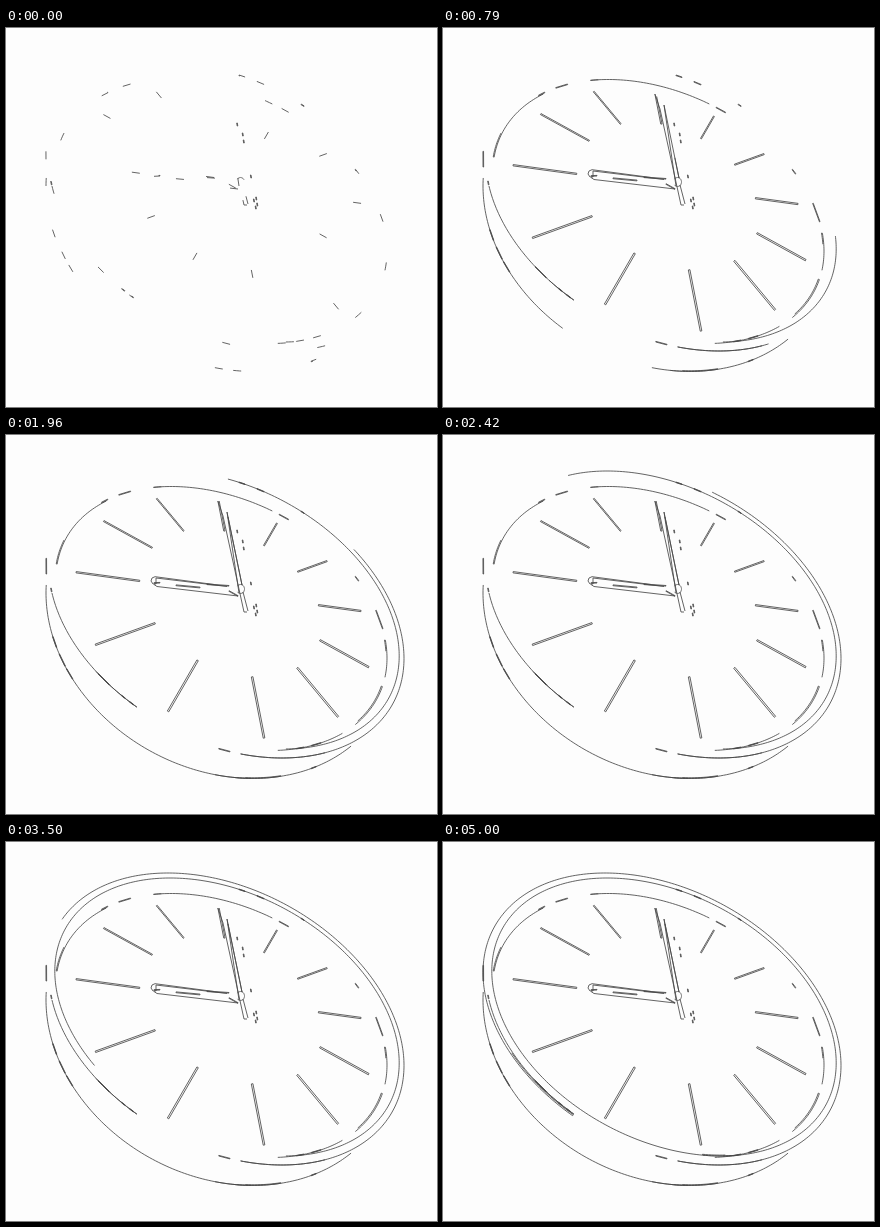
Write an HTML page that moves like this. It is 431 by 379 pixels and loops after 5210 ms.

```html
<!DOCTYPE html>
<html lang="en">
<head>
<meta charset="utf-8">
<title>Clock line drawing</title>
<style>
html, body { margin: 0; width: 100%; height: 100%; overflow: hidden; background: #fdfdfd; }
svg { display: block; width: 431px; height: 379px; }
path { fill: none; stroke: #484848; stroke-width: .85; stroke-linejoin: round; }
</style>
</head>
<body>
<svg id="stage" viewBox="0 0 431 379"></svg>
<script>
const LOOP = 5210, FRAME = 41.68, LAST = 120;
const FIRST_LENGTH = 8, SPEED = 8.9; // pixels drawn at the start, and per frame
const stage = document.getElementById('stage');
const strokes = [];

function line(points) {
  const path = document.createElementNS('http://www.w3.org/2000/svg', 'path');
  path.setAttribute('d', 'M' + points.map(p => p.map(v => v.toFixed(2)).join(' ')).join('L'));
  stage.append(path);
  strokes.push({ path, length: path.getTotalLength() });
}

// Thin outline that runs out along one side and back along the other
function bar([x1, y1], [x2, y2], width = .6) {
  const length = Math.hypot(x2 - x1, y2 - y1);
  const dx = -(y2 - y1) / length * width / 2, dy = (x2 - x1) / length * width / 2;
  const start = [x1 + dx, y1 + dy];
  line([start, [x2 + dx, y2 + dy], [x2 - dx, y2 - dy], [x1 - dx, y1 - dy], start]);
}

// Slanted ellipse: w and h are half extents, lean is the drop of its rightmost point
const ring = (cx, cy, w, h, lean) => (degrees, inset = 0) => {
  const t = degrees * Math.PI / 180, cos = Math.cos(t), sin = Math.sin(t);
  const scale = 1 - inset / ((w + h) / 2);
  return [cx + scale * w * cos, cy + scale * (lean * cos + Math.sqrt(h * h - lean * lean) * sin)];
};

// Runs through the angles in turn; the last leg lies a little inside
function trace(shape, angles, inset = 0) {
  const points = [];
  for (let i = 1; i < angles.length; i++) {
    const from = angles[i - 1], to = angles[i];
    const steps = Math.ceil(Math.abs(to - from));
    const gap = i > 1 && i === angles.length - 1 ? inset : 0;
    for (let k = 0; k <= steps; k++) points.push(shape(from + (to - from) * k / steps, gap));
  }
  line(points);
}

const dashes = (shape, pairs) => pairs.forEach(([from, to]) => bar(shape(from), shape(to)));

const rim = ring(219, 177, 179, 146, 46.5);
const lip = ring(221, 175, 172.2, 139, 45.9);
const dial = ring(215, 183.5, 166, 132, 39.6);
const side = ring(215, 186.7, 175, 156.7, 28.7);
const shade = degrees => rim(degrees, 2.5);

trace(rim, [56, 85, -240, -189], 1.5);
dashes(rim, [[183, 176.5], [88.4, 92]]);

trace(lip, [70, -294, -283, -291], 1);
dashes(lip, [[-84, -86], [-77.6, -80], [-63.4, -64.5]]);

trace(side, [183, 80]);
trace(side, [92, 42]);
trace(side, [86, 70, 82], .6);
dashes(side, [[57, 59], [164, 160], [148, 152], [153, 157.5]]);

trace(dial, [199, 187, 226], .8);
trace(dial, [288, 246, 249]);
trace(dial, [9, -8, -3], .8);
trace(dial, [36, 13.6, 34], 1);
trace(dial, [70, 43]);
dashes(dial, [[224, 227], [237, 232], [294, 290.5], [326, 324], [-13, -21], [53, 57], [60, 63]]);

trace(shade, [169, 120, 137]);
dashes(shade, [[171, 169.5], [136, 131], [126, 124.7], [122.8, 121.3]]);

// Point on the dial in perspective, radius 1 being the outer end of the marks
function dialPoint(hour, radius) {
  const t = hour * Math.PI / 6;
  const u = radius * Math.sin(t), v = -radius * Math.cos(t);
  const depth = 1 + .1227 * u - .2155 * v;
  return [230 + (140.3 * u + 22 * v) / depth, 159 + (19.1 * u + 113 * v) / depth];
}

const MARK_START = .633;
const drawnInward = [2, 3, 5, 10, 11];
for (let hour = 1; hour < 12; hour++) {
  const ends = [dialPoint(hour, MARK_START), dialPoint(hour, 1)];
  if (drawnInward.includes(hour)) ends.reverse();
  const nearness = 1 - .25 * Math.cos(hour * Math.PI / 6);
  bar(...ends, 1.3 * nearness);
}

// Minute hand, whose outline runs on into the top mark
const top12 = dialPoint(12, 1), low12 = dialPoint(12, MARK_START);
line([[241, 177], [238, 177], [217, 81], top12, low12, [low12[0] + 1.3, low12[1]], [top12[0] + 1.3, top12[1]]]);
line([[233, 158], [221, 77], [236, 150], [222, 82]]);
line([[242, 176], [237, 157]]);

// Hour hand and hub
line([[208, 149.5], [149, 141.7], [146, 143], [145, 146], [147, 149], [150, 149], [150, 143], [221, 151.5]]);
line([[232, 161], [151, 151.5], [148, 149.5]]);
bar([148, 148], [154, 147.7]);
bar([170, 150.3], [194, 152.5], .8);
bar([201, 149.3], [223, 150.8]);
bar([223, 156], [232, 161]);
trace(ring(234.5, 154, 4, 4.5, 0), [220, 500]);

// Flecks of shadow around the hub
[[231, 95], [236.5, 105], [237.5, 112], [244.7, 147], [247.7, 171], [250, 169], [251, 175], [249.5, 178]]
  .forEach(([x, y]) => bar([x, y], [x + .5, y + 3]));

function render(time) {
  const frame = Math.min(LAST, Math.floor((time % LOOP + 3) / FRAME));
  const drawn = FIRST_LENGTH + SPEED * frame;
  for (const { path, length } of strokes) {
    path.setAttribute('stroke-dasharray', drawn >= length ? 'none' : `${drawn} ${length + 10}`);
  }
}

const begin = performance.now();
function tick() {
  render(performance.now() - begin);
  requestAnimationFrame(tick);
}
tick();
</script>
</body>
</html>
```
